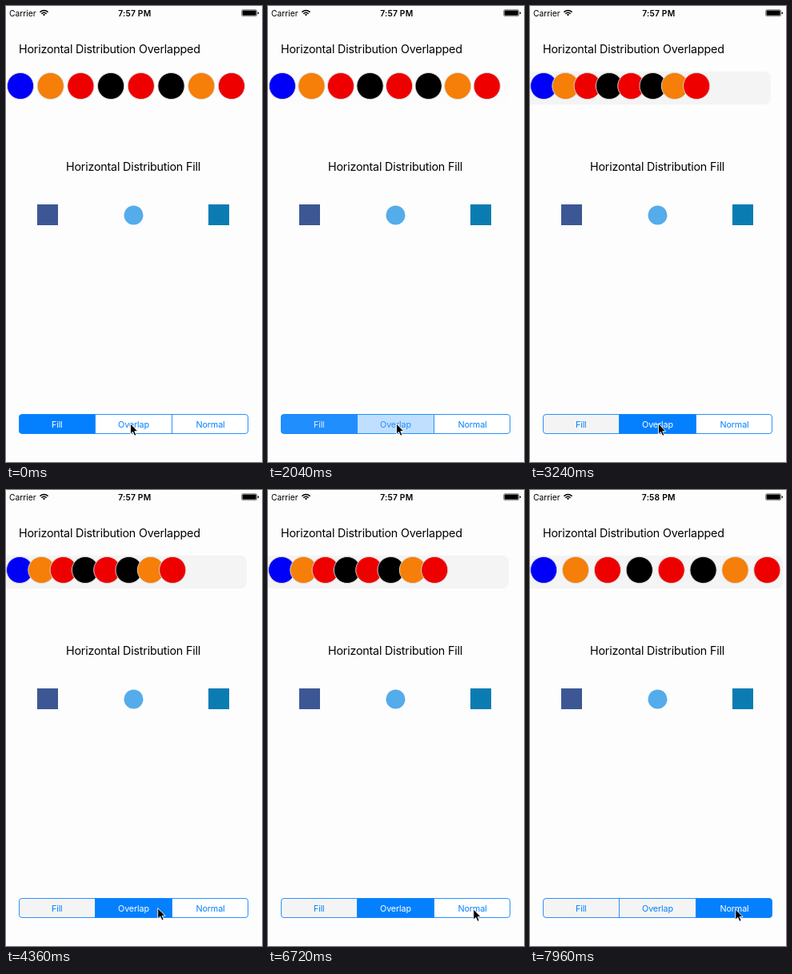
These frames come from a looping animation (320 px wide and 570 px high, 8 s). An HTML page:

```html
<!DOCTYPE html>
<html lang="en">
<head>
<meta charset="utf-8">
<title>Horizontal distribution</title>
<style>
  html, body { margin: 0; width: 100%; height: 100%; overflow: hidden; background: #fdfdfd; }
  svg { display: block; width: 100%; height: 100%; font-family: Inter, Roboto, sans-serif; }
  .heading { font-size: 14.3px; letter-spacing: -.19px; }
  .status { font-size: 10.3px; }
  .clock { font-weight: 600; letter-spacing: .2px; text-anchor: middle; }
  .label { font-size: 10.8px; letter-spacing: -.15px; text-anchor: middle; }
</style>
</head>
<body>
<svg viewBox="0 0 320 570">
  <defs><clipPath id="control"><rect x="16.4" y="510.4" width="286.2" height="24.2" rx="3.5"/></clipPath></defs>

  <text class="status" x="4" y="12.5">Carrier</text>
  <g fill="none" stroke="#000" stroke-width="1.4">
    <path d="M42.4 7.6Q47.5 3.2 52.6 7.6"/>
    <path d="M44.3 9.6Q47.5 6.9 50.7 9.6"/>
    <path d="M45.8 10.6L47.5 12.4L49.2 10.6Q47.5 9.4 45.8 10.6Z" fill="#000" stroke="none"/>
  </g>
  <text class="status clock" id="clock" x="160.8" y="12.5"></text>
  <rect x="294.6" y="4.7" width="19" height="8" rx="1.6" fill="none" stroke="#555" stroke-width=".7"/>
  <rect x="295.5" y="5.6" width="17.2" height="6.2" rx=".8"/>
  <path d="M314.6 7.2Q316.2 7.4 316.2 8.7T314.6 10.2Z"/>

  <text class="heading" x="16" y="59">Horizontal Distribution Overlapped</text>
  <rect id="track" x="-8" y="82" height="41" rx="8" fill="#f4f4f4"/>
  <g id="dots" stroke="#dcdcdc" stroke-width=".9"></g>

  <text class="heading" x="75" y="206">Horizontal Distribution Fill</text>
  <rect x="39" y="248" width="26" height="26" fill="#3d5795"/>
  <circle cx="159.5" cy="261.5" r="12" fill="#55acea"/>
  <rect x="253" y="248" width="26" height="26" fill="#0b7cb2"/>

  <g id="segments" clip-path="url(#control)"></g>
  <g fill="none" stroke="#0480ff" stroke-width=".85">
    <path d="M111.5 510.5V534.5M207.5 510.5V534.5"/>
    <rect x="16.5" y="510.5" width="286" height="24" rx="3.5"/>
  </g>
  <g id="labels"></g>

  <path id="cursor" d="M0 0V13.2L3 10.4L5.2 15.3L7.4 14.3L5.3 9.6H9.3Z" stroke="#fff" stroke-width=".9"/>
</svg>

<script>
const LOOP = 8000;
const FADE = 340;
const OVERLAP_AT = 2000;
const NORMAL_AT = 7620;
const BLUE = [4, 128, 255], WHITE = [255, 255, 255], RESTED = [244, 244, 244];
const DOT_COLORS = ['#0000f8', '#f57f08', '#ee0000', '#000', '#ee0000', '#000', '#f57f08', '#ee0000'];
const CURSOR_STEPS = [[0, 155.5, 522], [700, 155.5, 522], [1600, 160.5, 522], [4050, 160.5, 522], [4900, 256.8, 524]];

const byId = id => document.getElementById(id);
const clamp = v => Math.min(1, Math.max(0, v));
const mix = (a, b, k) => a + (b - a) * k;
const color = (a, b, k) => `rgb(${a.map((v, i) => Math.round(mix(v, b[i], k)))})`;
const fade = (t, start) => clamp((t - start) / FADE);

function add(parent, tag, attrs) {
  const el = document.createElementNS('http://www.w3.org/2000/svg', tag);
  for (const key in attrs) el.setAttribute(key, attrs[key]);
  return byId(parent).appendChild(el);
}

const dots = DOT_COLORS.map(fill => add('dots', 'circle', { cy: 100, r: 16.6, fill }));

const segments = [['Fill', 16, 95.5], ['Overlap', 111.5, 96], ['Normal', 207.5, 96]].map(([name, x, width]) => {
  const box = add('segments', 'rect', { x, width, y: 510, height: 25 });
  const label = add('labels', 'text', { class: 'label', x: x + width / 2, y: 526.5 });
  label.textContent = name;
  return { box, label };
});

// Damped spring from 0 to 1 with a slight overshoot.
function spring(ms) {
  if (ms <= 0) return 0;
  const omega = 10.5, damping = .7, s = ms / 1000;
  const root = Math.sqrt(1 - damping ** 2), phase = omega * root * s;
  return 1 - Math.exp(-damping * omega * s) * (Math.cos(phase) + damping / root * Math.sin(phase));
}

function cursorAt(t) {
  const next = CURSOR_STEPS.findIndex(step => step[0] > t);
  if (next < 0) return CURSOR_STEPS.at(-1).slice(1);
  const [t0, x0, y0] = CURSOR_STEPS[next - 1], [t1, x1, y1] = CURSOR_STEPS[next];
  const k = (t - t0) / (t1 - t0), eased = k * k * (3 - 2 * k);
  return [mix(x0, x1, eased), mix(y0, y1, eased)];
}

function drawSegment({ box, label }, rest, selected, pressed) {
  const tint = mix(pressed ? .15 : 0, 1, selected);
  box.setAttribute('fill', color(rest, BLUE, tint));
  label.setAttribute('fill', color(BLUE, WHITE, selected));
}

function draw(t) {
  const overlap = fade(t, OVERLAP_AT), normal = fade(t, NORMAL_AT);
  const shrink = spring(t - OVERLAP_AT + 10);
  const gap = mix(37.7, 27.3, shrink) + (39.6 - 27.3) * spring(t - NORMAL_AT);
  const first = mix(18, 17.1, clamp(shrink));

  dots.forEach((dot, i) => dot.setAttribute('cx', first + i * gap));
  byId('track').setAttribute('width', 8 + Math.max(301, first + 7 * gap + 20));
  byId('track').setAttribute('opacity', overlap);

  drawSegment(segments[0], overlap ? RESTED : WHITE, 1 - overlap, false);
  drawSegment(segments[1], normal ? RESTED : WHITE, overlap - normal, t >= 1840 && t < OVERLAP_AT + FADE);
  drawSegment(segments[2], WHITE, normal, t >= 7440);

  byId('clock').textContent = t < 7160 ? '7:57 PM' : '7:58 PM';
  byId('cursor').setAttribute('transform', `translate(${cursorAt(t)})`);
}

const began = performance.now();
function tick() {
  draw((performance.now() - began) % LOOP);
  requestAnimationFrame(tick);
}
tick();
</script>
</body>
</html>
```
